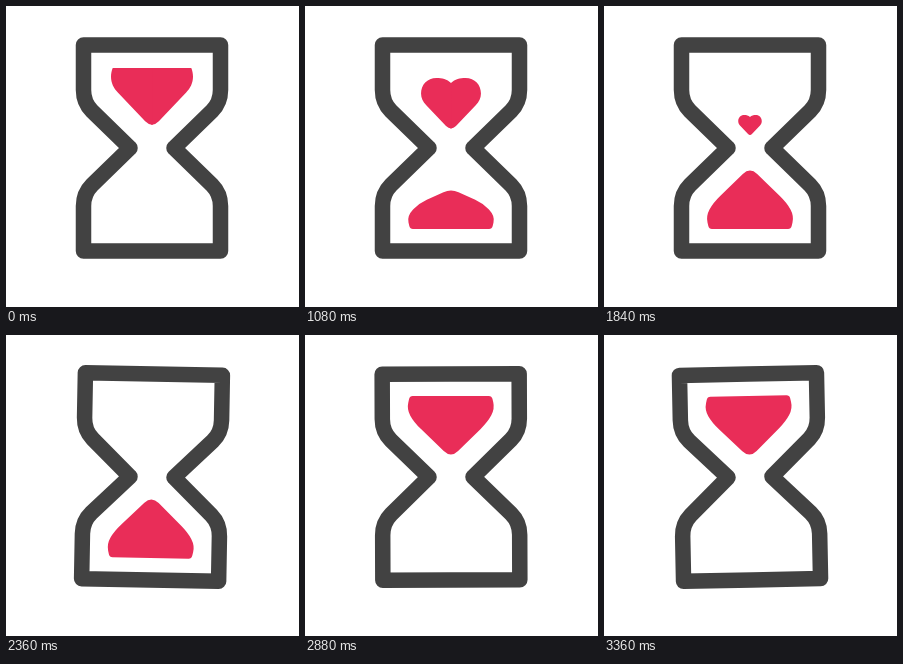
Write an HTML page with a canvas that moves like this. It is 293x301 px and loops after 3.4 s.

```html
<!DOCTYPE html>
<html>
<head>
<meta charset="utf-8">
<title>Heart hourglass</title>
<style>
html, body { margin: 0; width: 100%; height: 100%; overflow: hidden; background: #fff; }
canvas { display: block; }
</style>
</head>
<body>
<canvas id="stage" width="293" height="301"></canvas>
<script>
const ctx = document.getElementById('stage').getContext('2d');
const LOOP = 3400, FLIP = 2260, CX = 146, CY = 142;
const SAND = '#e92d58', FRAME = '#424242';

const mix = (a, b, k) => a + (b - a) * k;
const clamp = k => Math.max(0, Math.min(1, k));
const smooth = k => k * k * (3 - 2 * k);

// Adds one quarter of the frame; sx and sy mirror it
function quarter(sx, sy) {
  const path = new Path2D('M0-103H68.5V-58C68.5-49 66-43 60-37L22 0');
  const all = new Path2D();
  all.addPath(path, new DOMMatrix([sx, 0, 0, sy, 0, 0]));
  return all;
}
const glass = new Path2D();
for (const sx of [-1, 1]) for (const sy of [-1, 1]) glass.addPath(quarter(sx, sy));

// Right half of a heart 60 wide; the origin is the point it shrinks towards
const halfHeart = new Path2D(
  'M0-56C4-60 9-61 14.5-61C24-61 30-54 30-45.5C30-41 28-37 25-34L5-13Q2.5-10.5 0-10.5H-.5V-56Z');

function fillRounded(pts, radius) {
  const n = pts.length;
  const towards = (a, b, r) => {
    const d = Math.hypot(b[0] - a[0], b[1] - a[1]) || 1;
    const k = Math.min(r / d, 0.5);
    return [mix(a[0], b[0], k), mix(a[1], b[1], k)];
  };
  ctx.beginPath();
  pts.forEach((p, i) => {
    const r = i % (n - 1) ? radius : 3;
    ctx.lineTo(...towards(p, pts[(i + n - 1) % n], r));
    ctx.quadraticCurveTo(...p, ...towards(p, pts[(i + 1) % n], r));
  });
  ctx.fill();
}

// The pile rises to a peak, then leans over while the glass turns
function drawPile(t) {
  const grow = smooth(clamp(t / 1800));
  const lean = Math.sin(Math.PI * clamp((t - 2380) / 500));
  const peak = 62 * grow;
  const shoulder = Math.min(peak, 26), side = Math.min(peak * 0.8, 13);
  const reach = mix(22, 37, grow);
  const outline = [
    [-41, 0], [-44, side - 6 * lean],
    [-reach + 20 * lean, shoulder + 9 * lean],
    [0, peak + 7 * lean],
    [reach + 4 * lean, shoulder + 16 * lean],
    [44 + 2 * lean, side + 10 * lean], [41, 0]
  ];
  fillRounded(outline.map(([x, h]) => [x, 81 - h]), mix(5, 10, grow));
}

function drawHeart(t) {
  if (t >= FLIP) return;
  const size = 82 / 60 * Math.cos(t / FLIP * Math.PI / 2);
  ctx.save();
  ctx.beginPath();
  ctx.rect(-CX, -80, 2 * CX, 100);
  ctx.clip();
  ctx.translate(0, -9);
  ctx.scale(size, size);
  ctx.fill(halfHeart);
  ctx.scale(-1, 1);
  ctx.fill(halfHeart);
  ctx.restore();
}

// Flip over, then swing to rest
function tilt(t) {
  if (t < FLIP) return 0;
  const half = FLIP + 445;
  if (t < half) return 90 * ((t - FLIP) / 445) ** 3;
  const turn = 180 - 90 * clamp((2910 - t) / (2910 - half)) ** 3;
  const u = Math.max(0, t - 2880);
  return turn + 6 * Math.exp(-u / 400) * Math.sin(2 * Math.PI * u / 540);
}

function draw(t) {
  ctx.fillStyle = '#fff';
  ctx.fillRect(0, 0, 293, 301);
  ctx.save();
  ctx.translate(CX, CY);
  ctx.rotate(tilt(t) * Math.PI / 180);
  ctx.strokeStyle = FRAME;
  ctx.lineWidth = 15.5;
  ctx.lineJoin = ctx.lineCap = 'round';
  ctx.stroke(glass);
  ctx.fillStyle = SAND;
  drawPile(t);
  drawHeart(t);
  ctx.restore();
}

const start = performance.now();
function tick() {
  draw((performance.now() - start) % LOOP);
  requestAnimationFrame(tick);
}
tick();
</script>
</body>
</html>
```
